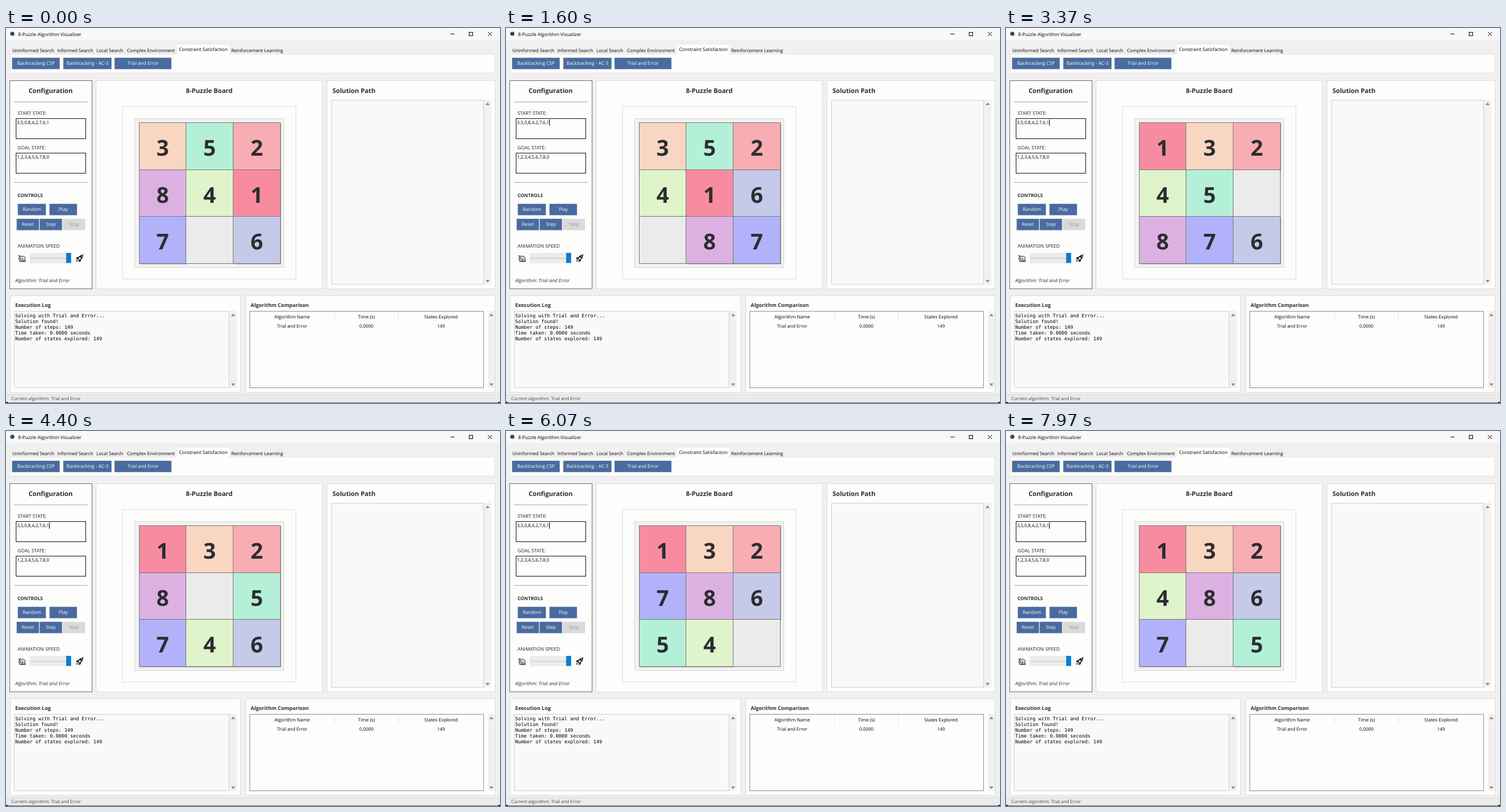
Write an HTML page with a canvas that moves like this. It is 858 px wide and 652 px high and loops after 8000 ms.

```html
<!DOCTYPE html>
<html lang="en">
<head>
<meta charset="utf-8">
<title>8-Puzzle Algorithm Visualizer</title>
<style>
html, body { margin: 0; width: 100%; height: 100%; overflow: hidden; background: #f0f0f0; }
canvas { display: block; }
</style>
</head>
<body>
<canvas id="stage" width="858" height="652"></canvas>
<script>
const ctx = document.getElementById('stage').getContext('2d');
const LOOP = 8000;
const SANS = '"Open Sans", "Noto Sans", sans-serif';
const MONO = '"DejaVu Sans Mono", monospace';
const INK = '#000', HEAD = '#2b2d30', BLUE = '#4a6b9f', CARD = '#fdfdfc', LINE = '#dcdcdc';

// Board: 0 is the blank; each letter moves the blank one cell.
const START = [3, 5, 2, 8, 4, 1, 7, 0, 6];
const MOVES = 'LUR' + 'RDLLURUL' + 'DDRRU' + 'LLDRURDLUL' + 'DRRULDL' + 'URRDL';
const STEP = { L: -1, R: 1, U: -3, D: 3 };
const TILE = ['#ebebeb', '#f78ca0', '#f8adb3', '#f9d6c1', '#e0f4cb',
  '#b4f0d8', '#c4cae8', '#b1b2fa', '#dcb1e2'];
// Move number and the time it happens; even pace in between.
const PACE = [[1, 280], [4, 985], [11, 2375], [16, 3360], [26, 5385], [33, 6710], [38, 7800]];

function moveTime(n) {
  const i = Math.max(1, PACE.findIndex(p => p[0] >= n));
  const [n0, t0] = PACE[i - 1], [n1, t1] = PACE[i];
  return t0 + (t1 - t0) * (n - n0) / (n1 - n0);
}

function boardAt(time) {
  const cells = START.slice();
  let blank = cells.indexOf(0);
  for (let n = 1; n <= MOVES.length && moveTime(n) <= time; n++) {
    const next = blank + STEP[MOVES[n - 1]];
    cells[blank] = cells[next];
    cells[next] = 0;
    blank = next;
  }
  return cells;
}

function caretOn(time) {
  const phase = time % 915;
  return phase >= 255 && phase < 865;
}

function fill(x0, y0, x1, y1, color) {
  ctx.fillStyle = color;
  ctx.fillRect(x0, y0, x1 - x0, y1 - y0);
}

function box(x0, y0, x1, y1, color, border) {
  fill(x0, y0, x1, y1, color);
  ctx.strokeStyle = border;
  ctx.lineWidth = 1;
  ctx.strokeRect(x0 + 0.5, y0 + 0.5, x1 - x0 - 1, y1 - y0 - 1);
}

function path(points, color, width = 1, closed = false) {
  ctx.beginPath();
  points.forEach(([x, y]) => ctx.lineTo(x, y));
  if (closed) ctx.closePath();
  ctx.strokeStyle = color;
  ctx.lineWidth = width;
  ctx.stroke();
}

// y is the middle of the capital letters.
function text(str, x, y, size, { color = INK, align = 'left', style = '', family = SANS } = {}) {
  ctx.font = `${style} ${size}px ${family}`;
  ctx.textAlign = align;
  ctx.fillStyle = color;
  ctx.fillText(str, x, y + size * 0.357);
}

function heading(str, x, y, size, align = 'left') {
  text(str, x, y, size, { color: HEAD, align, style: 'bold' });
}

function button(label, x0, y0, x1, y1, color = BLUE, ink = '#fff') {
  fill(x0 - 0.5, y0 - 0.3, x1 + 0.3, y1 + 0.5, color);
  text(label, (x0 + x1) / 2, (y0 + y1) / 2, 8.2, { color: ink, align: 'center' });
}

function arrow(x, y, dir) {
  ctx.beginPath();
  ctx.moveTo(x - 3.5, y - 2 * dir);
  ctx.lineTo(x + 3.5, y - 2 * dir);
  ctx.lineTo(x, y + 2.5 * dir);
  ctx.fillStyle = '#8b8b8b';
  ctx.fill();
}

function scrollbar(x0, y0, x1, y1) {
  fill(x0, y0, x1, y1, '#f1f1f1');
  const x = (x0 + x1) / 2;
  arrow(x, y0 + 7, -1);
  arrow(x, y1 - 6, 1);
}

function titleBar() {
  fill(0, 0, 858, 21, '#f8f8f8');
  ctx.beginPath();
  ctx.arc(11, 10, 3.6, 0, 7);
  ctx.fillStyle = '#35435f';
  ctx.fill();
  text('8-Puzzle Algorithm Visualizer', 21, 11, 8.2);
  path([[772, 10.5], [779, 10.5]], INK);
  ctx.strokeRect(804.5, 7.5, 6, 6);
  path([[837, 7], [844, 14]], INK);
  path([[844, 7], [837, 14]], INK);
}

function tabs() {
  box(7, 45, 849, 79, CARD, '#e4e4e4');
  fill(297, 29, 388, 47, CARD);
  const names = [['Uninformed Search', 11], ['Informed Search', 89], ['Local Search', 157],
    ['Complex Environment', 210], ['Constraint Satisfaction', 300.5], ['Reinforcement Learning', 391]];
  names.forEach(([name, x], i) => text(name, x, i === 4 ? 37.5 : 38.7, 8.05));
  button('Backtracking CSP', 11, 52, 93, 71);
  button('Backtracking - AC-3', 100, 52, 183, 71);
  button('Trial and Error', 189, 52, 287, 71);
}

function snail() {
  path([[22, 395], [23.5, 398], [22.5, 401], [24, 406], [34, 406], [33, 403.5]], INK);
  path([[25, 395], [24.3, 398]], INK);
  ctx.beginPath();
  ctx.arc(29, 401, 4.2, 0, 7);
  ctx.stroke();
  ctx.beginPath();
  ctx.arc(29, 401.5, 1.5, 0, 5);
  ctx.stroke();
}

function rocket() {
  path([[133.5, 394.5], [129, 396], [124.5, 401], [127.5, 404], [132, 400]], INK, 1.3, true);
  path([[126.5, 398.5], [123, 399.5], [122.5, 402.5]], INK, 1.3);
  path([[129.5, 402.5], [129, 405], [126, 406.5]], INK, 1.3);
  path([[124.5, 403.5], [122.5, 406]], INK, 1.3);
  ctx.beginPath();
  ctx.arc(130, 398, 1, 0, 7);
  ctx.stroke();
}

function entry(label, value, y) {
  text(label, 20, y - 8.5, 8.4, { color: '#222' });
  box(17, y, 139, y + 36, CARD, '#111');
  text(value, 19, y + 7.5, 7.9);
}

function configPanel(time) {
  box(6, 91, 150, 454, CARD, '#6b6f66');
  heading('Configuration', 77.5, 109.5, 11.15, 'center');
  fill(14, 128, 142, 129, '#a5a5a5');
  fill(14, 268, 142, 269, '#a5a5a5');

  entry('START STATE:', '3,5,0,8,4,2,7,6,1', 157);
  if (caretOn(time)) fill(75, 159, 76, 170, '#000');
  entry('GOAL STATE:', '1,2,3,4,5,6,7,8,0', 217);

  heading('CONTROLS', 20, 291.5, 8.2);
  button('Random', 21, 306, 69, 325);
  button('Play', 76, 306, 123, 325);
  button('Reset', 19, 332, 57, 351);
  button('Step', 59, 332, 97, 351);
  button('Stop', 99, 332, 137, 351, '#dadada', '#949494');

  text('ANIMATION SPEED', 20, 379.5, 8.4, { color: '#222' });
  fill(41, 391, 114, 409, '#ececec');
  fill(42, 399, 113, 402, '#dcdcd2');
  fill(104.5, 391, 113, 408.5, '#0a7bd3');
  snail();
  rocket();
  text('Algorithm: Trial and Error', 16, 438.5, 8.45, { color: '#333', style: 'italic' });
}

function boardPanel(time) {
  box(156, 91, 550, 454, CARD, LINE);
  heading('8-Puzzle Board', 353, 109.5, 11.15, 'center');
  box(202, 136, 504, 437, CARD, LINE);
  box(223, 157, 483, 417, '#f2f2f2', '#d6d6d6');
  // Neighbouring tiles share their border line.
  const edgeX = k => Math.floor(231 + k * 81.67);
  const edgeY = k => Math.floor(164.5 + k * 81.67);
  boardAt(time).forEach((n, i) => {
    const col = i % 3, row = Math.floor(i / 3);
    const x0 = edgeX(col), x1 = edgeX(col + 1) + 1;
    const y0 = edgeY(row), y1 = edgeY(row + 1) + 1;
    if (n) fill(x0 + 2, y0 + 2, x1 + 1, y1 + 1, '#b4b4b4');
    box(x0, y0, x1, y1, TILE[n], '#777');
    if (n) heading(n, (x0 + x1) / 2, y0 + 44, 38, 'center');
  });
}

function solutionPanel() {
  box(557, 91, 850, 454, CARD, LINE);
  heading('Solution Path', 567, 109.5, 11.1);
  box(565, 125, 830, 446, '#f9f9f9', '#cfcfcf');
  scrollbar(830, 125, 843, 446);
}

function logPanel() {
  box(7, 465, 408, 634, CARD, LINE);
  heading('Execution Log', 16, 482, 8.95);
  box(14, 492, 388, 626, '#f9f9f9', '#cfcfcf');
  scrollbar(388, 492, 401, 626);
  const lines = ['Solving with Trial and Error...', 'Solution found!', 'Number of steps: 149',
    'Time taken: 0.0000 seconds', 'Number of states explored: 149'];
  lines.forEach((line, i) => text(line, 16, 500 + i * 10, 8.36, { family: MONO }));
}

function comparisonPanel() {
  box(416, 465, 850, 634, CARD, LINE);
  heading('Algorithm Comparison', 425, 482, 8.95);
  box(423, 492, 830, 626, CARD, '#8a8d96');
  fill(570, 494, 571, 510, '#e2e2e2');
  fill(681, 494, 682, 510, '#e2e2e2');
  const columns = [['Algorithm Name', 'Trial and Error', 497], ['Time (s)', '0.0000', 626],
    ['States Explored', '149', 755.5]];
  for (const [title, value, x] of columns) {
    text(title, x, 502, 8, { align: 'center' });
    text(value, x, 518, 7.9, { align: 'center' });
  }
  scrollbar(837, 492, 849, 626);
}

function statusBar() {
  fill(0, 637, 858, 652, '#ebebeb');
  fill(0, 637, 858, 638, '#dadada');
  text('Current algorithm: Trial and Error', 9, 644.3, 7.8, { color: '#444' });
  fill(0, 651, 858, 652, '#666');
  for (const x of [0, 855]) fill(x, 650, x + 3, 652, '#222');
}

function draw(time) {
  ctx.textRendering = 'geometricPrecision';
  fill(0, 0, 858, 652, '#f0f0f0');
  titleBar();
  tabs();
  configPanel(time);
  boardPanel(time);
  solutionPanel();
  logPanel();
  comparisonPanel();
  statusBar();
}

const began = performance.now();
function tick() {
  draw((performance.now() - began) % LOOP);
  requestAnimationFrame(tick);
}
tick();
</script>
</body>
</html>
```
